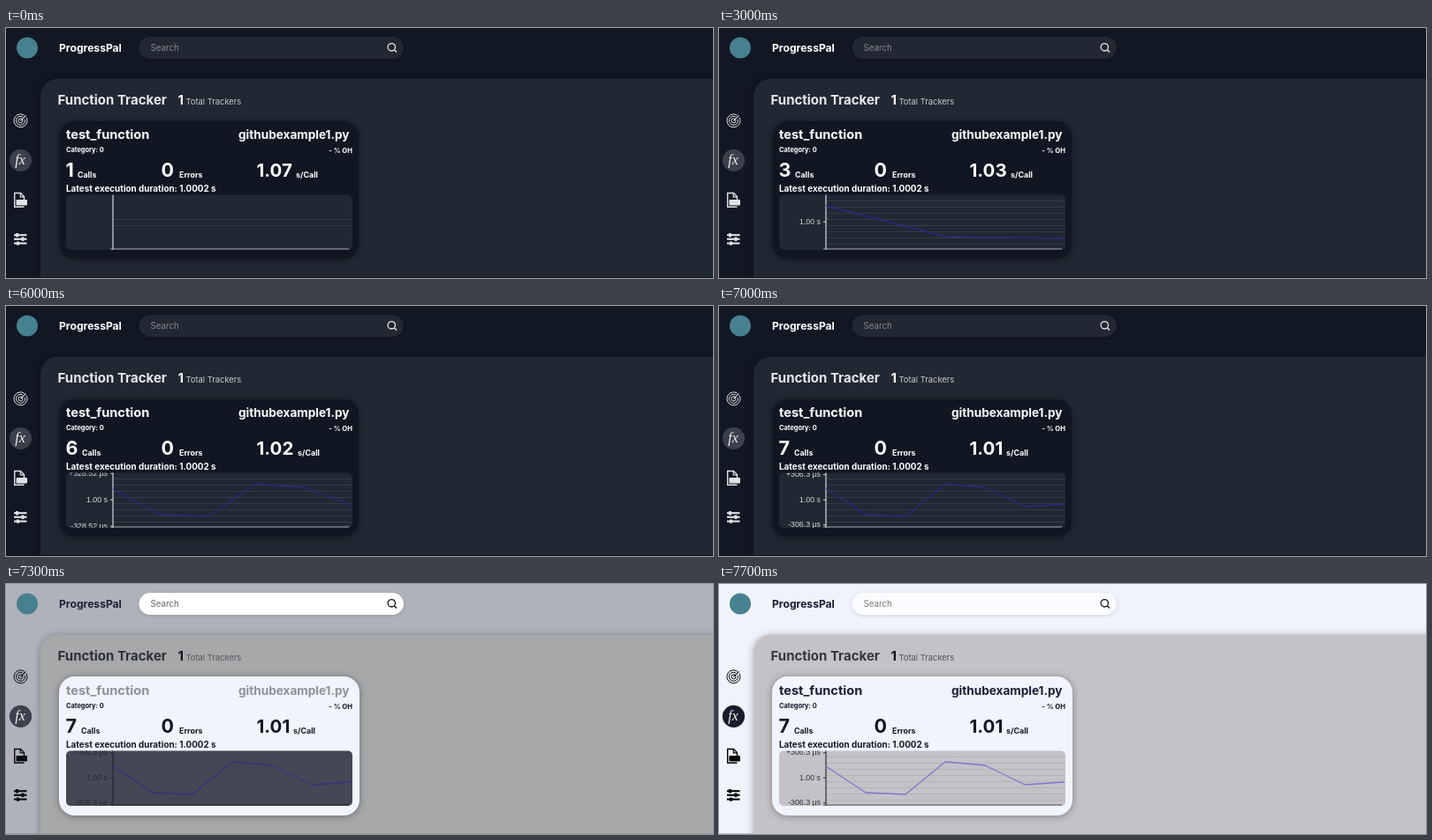
These frames come from a looping animation (800 px wide and 284 px high, 8 s). An HTML page with a canvas:

```html
<!DOCTYPE html>
<html lang="en">
<head>
<meta charset="utf-8">
<title>Function tracker</title>
<style>
html, body { margin: 0; width: 100%; height: 100%; overflow: hidden; background: #111723; }
canvas { display: block; width: 800px; height: 284px; }
</style>
</head>
<body>
<canvas id="stage" width="800" height="284"></canvas>
<script>
const ctx = document.getElementById('stage').getContext('2d');
const LOOP = 8000, SWITCH = 7200;
const SANS = 'Inter, sans-serif';

// Colours: dark theme, first and second step of the switch, light theme.
const THEME = {
  bg: ['#111723', '#111824', '#afb2bb', '#f0f3fc'],
  panel: ['#202833', '#69696f', '#a6a8a9', '#c4c2c6'],
  card: ['#111623', '#f1f4fd', '#f1f4fd', '#f1f4fd'],
  search: ['#212833', '#ffffff', '#ffffff', '#fbfcff'],
  hint: ['#85888f', '#666666', '#666666', '#777777'],
  lens: ['#e8e8ea', '#15161c', '#15161c', '#15161c'],
  brand: ['#ffffff', '#262430', '#1c2030', '#151a30'],
  title: ['#e6e7ea', '#25262e', '#2e3038', '#36363f'],
  count: ['#ffffff', '#15161e', '#14151c', '#121320'],
  sub: ['#c9cbd0', '#4c4c53', '#55565c', '#505058'],
  name: ['#ffffff', '#ffffff', '#8f9199', '#1a2036'],
  body: ['#ffffff', '#141624', '#141624', '#141624'],
  icon: ['#e0e2e6', '#05070c', '#0a0b10', '#000000'],
  badge: ['#3a404c', '#323948', '#3e404d', '#1a1b2b'],
  chart: ['#202833', '#202833', '#444854', '#c4c2c6'],
  grid: ['#353c47', '#39404b', '#434753', '#b5b3b8'],
  axis: ['#d5d7db', '#d5d7db', '#24272f', '#333238'],
  base: ['#a5a8ae', '#a5a8ae', '#24272f', '#55545a'],
  line: ['#2b2880', '#2d2592', '#33327c', '#8175cf'],
  strip: ['#130e1e', '#2a2228', '#9a989b', '#c0bec2']
};

// One entry per call count: average, label positions, line heights, axis tick.
const STATES = [
  { avg: '1.07', callsX: 81, unitX: 328, ys: [] },
  { avg: '1.04', callsX: 85, unitX: 331, ys: [202, 238] },
  { avg: '1.03', callsX: 86, unitX: 330, ys: [202, 237, 239] },
  { avg: '1.02', callsX: 87, unitX: 330, ys: [208, 237, 239, 203], tick: '392.25', gap: 33 },
  { avg: '1.02', callsX: 86, unitX: 330, ys: [208, 237, 239, 202, 206], tick: '351.64', gap: 31.5 },
  { avg: '1.02', callsX: 86, unitX: 330, ys: [208, 237, 239, 202, 206, 226], tick: '328.52', gap: 30 },
  { avg: '1.01', callsX: 85, unitX: 325, ys: [207, 237, 239, 202, 206, 228, 225], tick: '306.3', gap: 28.5 }
];

function mix(a, b, u) {
  const channel = (hex, i) => parseInt(hex.slice(i, i + 2), 16);
  return 'rgb(' + [1, 3, 5].map(i =>
    Math.round(channel(a, i) + (channel(b, i) - channel(a, i)) * u)).join() + ')';
}

function paletteAt(t) {
  const u = Math.min(1, Math.max(0, (t - SWITCH - 100) / 400));
  const eased = 1 - Math.pow(1 - u, 2.5);
  const pick = c => t < SWITCH ? c[0] : t < SWITCH + 100 ? c[1] : mix(c[2], c[3], eased);
  return Object.fromEntries(Object.entries(THEME).map(([key, c]) => [key, pick(c)]));
}

function text(str, x, y, size, color, weight = 700, align = 'left', family = SANS) {
  ctx.font = `${weight} ${size}px ${family}`;
  ctx.textAlign = align;
  ctx.fillStyle = color;
  ctx.fillText(str, x, y);
}

function box(x, y, w, h, r, color) {
  ctx.fillStyle = color;
  ctx.beginPath();
  ctx.roundRect(x, y, w, h, r);
  ctx.fill();
}

function disc(x, y, r, color) {
  ctx.fillStyle = color;
  ctx.beginPath();
  ctx.arc(x, y, r, 0, Math.PI * 2);
  ctx.fill();
}

function ring(x, y, r, from = 0, to = Math.PI * 2) {
  ctx.beginPath();
  ctx.arc(x, y, r, from, to);
  ctx.stroke();
}

function path(points, color, width = 1) {
  ctx.strokeStyle = color;
  ctx.lineWidth = width;
  ctx.beginPath();
  points.forEach(([x, y]) => ctx.lineTo(x, y));
  ctx.stroke();
}

function withShadow(blur, alpha, draw) {
  ctx.save();
  ctx.shadowColor = `rgba(0,0,0,${alpha})`;
  ctx.shadowBlur = blur;
  ctx.shadowOffsetY = 1;
  draw();
  ctx.restore();
}

function drawHeader(p) {
  disc(24, 22.5, 12, '#47808f');
  text('ProgressPal', 60, 26.5, 12.1, p.brand);
  withShadow(4, 0.15, () => box(150.5, 10, 299.5, 25, 12.5, p.search));
  text('Search', 163.5, 26, 9.7, p.hint, 400);
  ctx.strokeStyle = p.lens;
  ctx.lineWidth = 1.3;
  ring(436.3, 21.8, 4.2);
  path([[439.3, 24.8], [442, 27.5]], p.lens, 1.4);
}

function drawSidebar(p) {
  ctx.strokeStyle = p.icon;
  ctx.lineWidth = 1;
  ring(16.5, 105.3, 7.5, -0.5, 5.3);
  ring(16.5, 105.3, 5, -0.3, 5.2);
  ring(16.5, 105.3, 2.5);
  path([[16.5, 105.3], [22.5, 99.3]], p.icon, 1.2);

  disc(16.5, 150.3, 12.6, p.badge);
  text('fx', 16, 154.5, 16, '#f2f2f4', 'italic 400', 'center', '"Liberation Serif", serif');

  path([[20.5, 203.2], [9.7, 203.2], [9.7, 187.5], [16.5, 187.5], [20.5, 191.5], [20.5, 195]], p.icon, 1.4);
  path([[16.3, 187.5], [16.3, 191.8], [20.5, 191.8]], p.icon, 1.2);
  box(11.5, 195, 12.5, 6.5, 1, p.icon);

  [[235.2, 12.5], [239.8, 19], [244.6, 13.5]].forEach(([y, knob]) => {
    path([[9, y], [23.5, y]], p.icon, 2.1);
    box(knob - 1.6, y - 2.2, 3.2, 4.4, 1, p.icon);
  });
}

function drawChart(p, state, t) {
  ctx.save();
  ctx.beginPath();
  ctx.roundRect(68, 189.5, 324, 62.5, 5);
  ctx.clip();
  ctx.fillStyle = p.chart;
  ctx.fillRect(68, 189, 324, 64);

  const reveal = Math.min(1, t / 400);
  for (let y = 196.5; y < 250; y += 7) {
    ctx.globalAlpha = y === 217.5 || y === 224.5 ? 1 : reveal;
    path([[121, y], [391, y]], p.grid);
  }

  const label = (str, y) => {
    text(str, 115, y + 3, 8.8, p.axis, 400, 'right', '"Liberation Sans", Arial, sans-serif');
    path([[118, y + 0.5], [121, y + 0.5]], p.axis);
  };
  ctx.globalAlpha = reveal;
  label('1.00 s', 219.7);
  ctx.globalAlpha = 1;
  if (state.tick) {
    label(`+${state.tick} µs`, 219.7 - state.gap);
    label(`-${state.tick} µs`, 219.7 + state.gap);
  }

  path([[121, 189], [121, 252]], p.axis, 1.2);
  path([[118, 251], [388, 251]], p.base);
  const step = 270 / (state.ys.length - 1);
  ctx.lineJoin = 'round';
  path(state.ys.map((y, i) => [121 + i * step, y]), p.line, 1.3);
  ctx.restore();
}

function drawCard(p, state, calls, t) {
  const light = t >= SWITCH;
  withShadow(9, light ? 0.35 : 0.4, () => light
    ? box(60, 105, 340, 158, 18, p.card)
    : box(60.5, 106, 338.5, 156, 17, p.card));

  text('test_function', 68, 125.5, 14.6, p.name);
  text('githubexample1.py', 388.5, 125.5, 13.6, p.name, 700, 'right');
  text('Category: 0', 68, 140.5, 7.4, p.body);
  text('- % OH', 392, 142, 7.7, p.body, 700, 'right');

  text(calls, 67.5, 169, 21.5, p.body);
  text('Calls', state.callsX, 169.5, 8.8, p.body);
  text('0', 175.5, 169, 21.5, p.body);
  text('Errors', 196, 169.5, 8.9, p.body);
  text(state.avg, 283.5, 169, 20.5, p.body);
  text('s/Call', state.unitX, 169.5, 8.9, p.body);
  text('Latest execution duration: 1.0002 s', 68, 186.3, 9.9, p.body);
  drawChart(p, state, t);
}

function draw(t) {
  const p = paletteAt(t);
  const calls = Math.max(1, Math.min(7, Math.floor(t / 1000)));

  ctx.fillStyle = p.bg;
  ctx.fillRect(0, 0, 800, 284);
  withShadow(9, 0.3, () => box(39, 57.5, 790, 260, 20, p.panel));
  ctx.fillStyle = p.strip;
  ctx.fillRect(0, 283, 800, 1);

  drawHeader(p);
  drawSidebar(p);
  text('Function Tracker', 58.5, 87, 15, p.title);
  text('1', 194.5, 87, 15, p.count);
  text('Total Trackers', 203.5, 87, 9.4, p.sub, 400);
  drawCard(p, STATES[calls - 1], calls, t);
}

const start = performance.now();
function tick() {
  const t = (performance.now() - start) % LOOP;
  draw(Math.floor(t / 100) * 100);
  requestAnimationFrame(tick);
}
tick();
</script>
</body>
</html>
```
